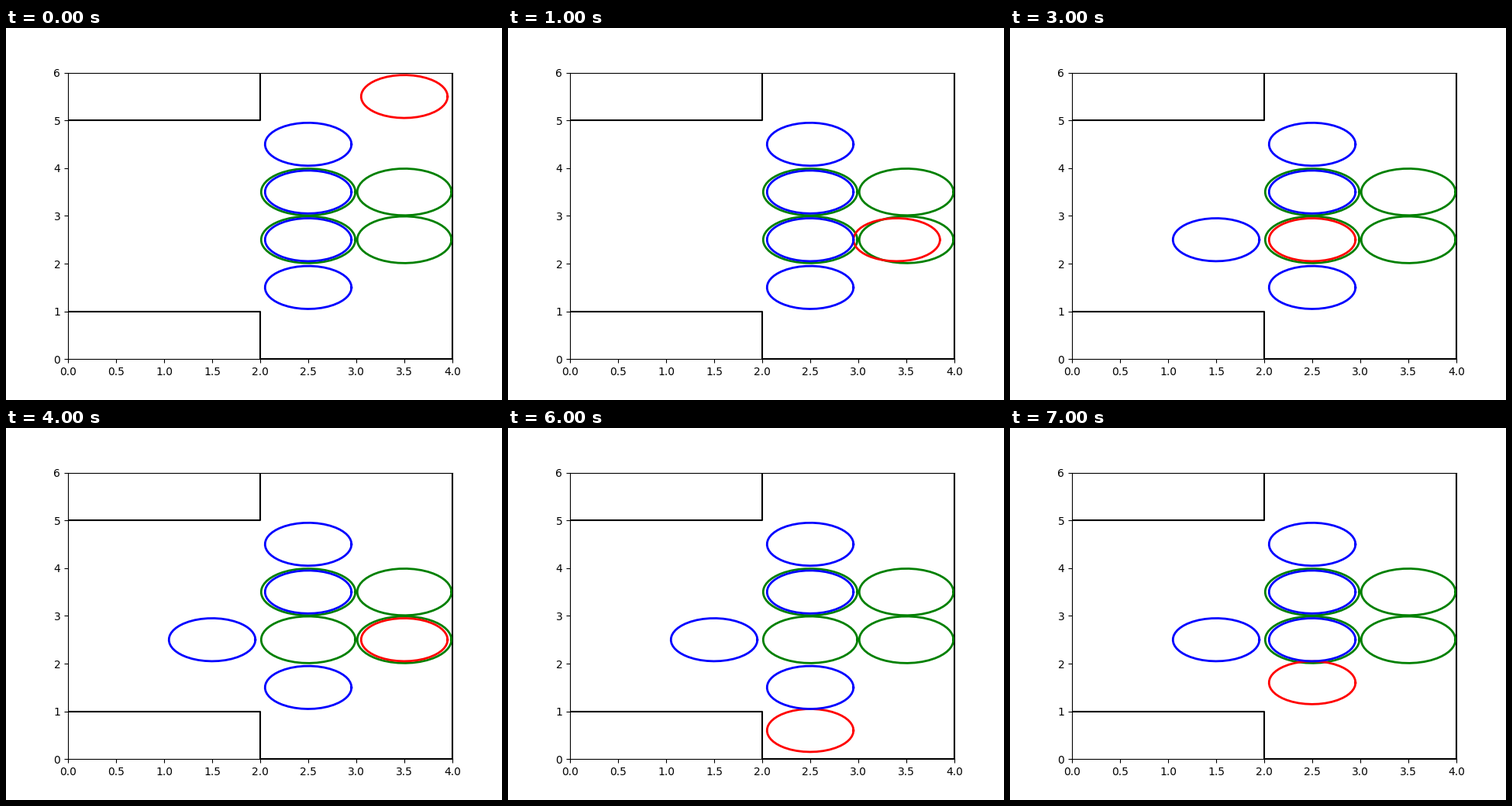
A matplotlib script that plays this animation: 640x480 px, repeating every 8000 ms.

```python
from itertools import product

import numpy as np
import matplotlib.pyplot as plt
from matplotlib.animation import FuncAnimation

# Coarse simplification gives the rings their faceted look.
plt.rcParams["path.simplify_threshold"] = 1 / 3

ROOM = [(0, 1), (2, 1), (2, 0), (4, 0), (4, 6), (2, 6), (2, 5), (0, 5), (0, 1)]
STOPS = [(3.5, 5.5), (3.4, 2.5), (2.4, 2.5), (2.5, 2.5),
         (3.5, 2.5), (3.5, 0.5), (2.5, 0.6), (2.5, 1.6)]
path = np.array(STOPS)
angle = np.linspace(0, 2 * np.pi, 200)


def outline(center, radius):
    return center[0] + radius * np.cos(angle), center[1] + radius * np.sin(angle)


def ring(center, radius, color):
    line, = ax.plot(*outline(center, radius), color=color, linewidth=2)
    return line


def boxes_at(step):
    """Boxes after the robot has pushed every one it ran into."""
    boxes = np.array([(2.5, row + 0.5) for row in range(1, 5)])
    for before, after in zip(path[:step], path[1:step + 1]):
        hit = np.hypot(*(boxes - after).T) < 0.5
        boxes[hit] += after - before
    return boxes


fig, ax = plt.subplots(figsize=(6.4, 4.8), dpi=100)
ax.set_xlim(0, 4)
ax.set_ylim(0, 6)
ax.plot(*zip(*ROOM), color="black", linewidth=1.5)
for goal in product((2.5, 3.5), repeat=2):
    ring(goal, 0.49, "green")
robot = ring(path[0], 0.45, "red")
boxes = [ring(center, 0.45, "blue") for center in boxes_at(0)]


def update(step):
    robot.set_data(*outline(path[step], 0.45))
    for box, center in zip(boxes, boxes_at(step)):
        box.set_data(*outline(center, 0.45))
    return [robot, *boxes]


anim = FuncAnimation(fig, update, frames=len(path), interval=1000,
                     repeat=True, repeat_delay=0)
plt.show()
```
